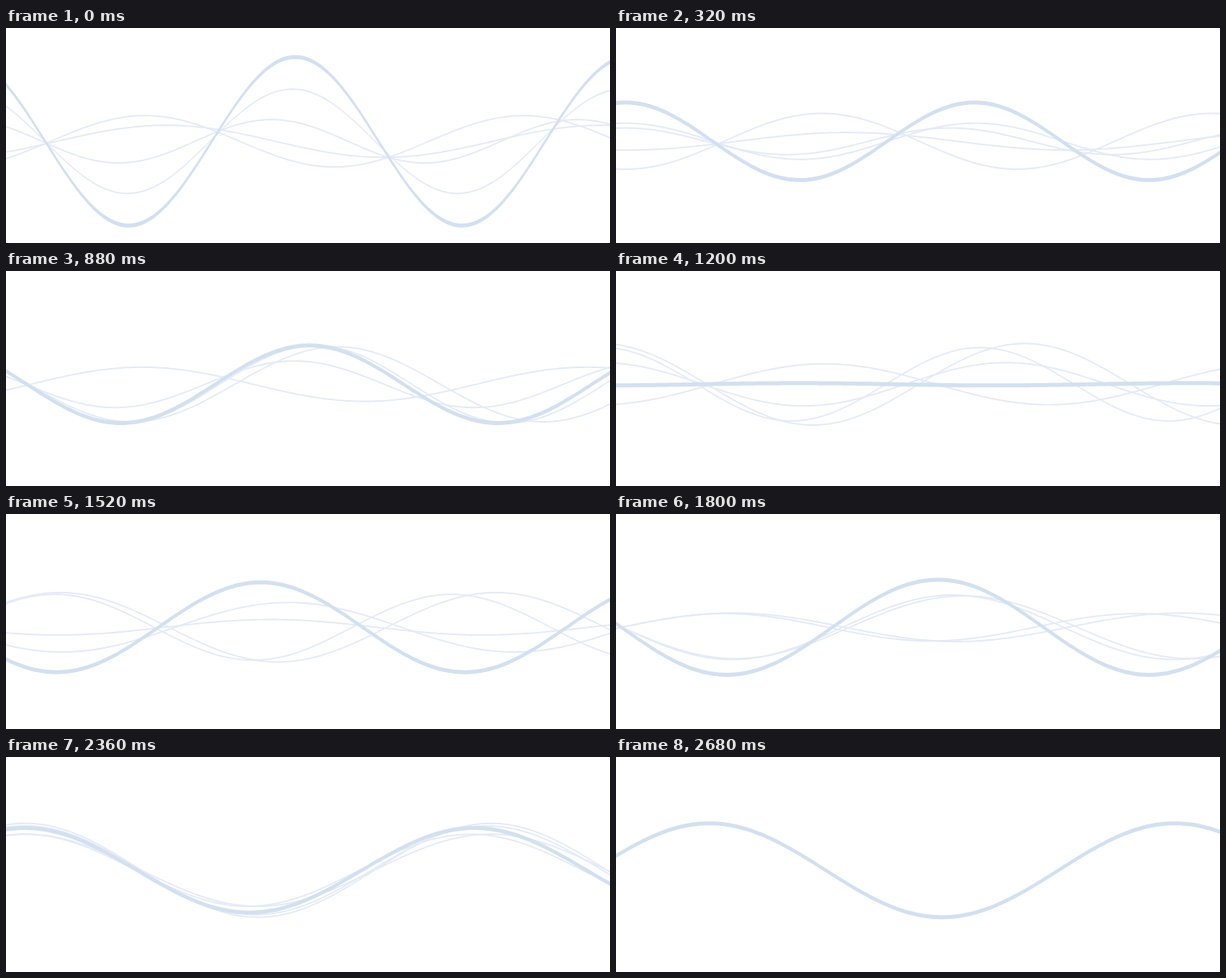
An HTML page for the animation above (2.72 s loop, 750 px wide and 268 px high).

```html
<!DOCTYPE html>
<html lang="en">
<head>
<meta charset="utf-8">
<title>Waves</title>
<style>
  html, body { margin: 0; width: 100%; height: 100%; overflow: hidden; background: #fff; }
  svg { display: block; width: 100%; height: 100%; }
</style>
</head>
<body>
<svg id="stage" viewBox="0 0 750 268"></svg>
<script>
const LOOP = 2720, STEP = 40, WIDTH = 750, MID = 141.2;
const END = 2680, END_HALF = 289, END_AMP = 58.5;
const THIN = { color: '#e4eaf6', thick: 1.9 };
const BOLD = { color: '#d3e0ef', thick: 5 };

// half: first half wavelength, which grows to END_HALF by the time meet
// turns: [time, amplitude] where the swing reverses
const waves = [
  { ...THIN, half: 270.5, meet: END, turns: [[0, -20], [1080, 25], [END, END_AMP]] },
  { ...THIN, half: 235, meet: 2300, turns: [[0, -32], [1280, -51], [END, END_AMP]] },
  { ...THIN, half: 190, meet: END, turns: [[0, 27], [1310, -47], [END, END_AMP]] },
  { ...THIN, half: 205, meet: 2180, turns: [[0, 65], [770, -50], [2180, END_AMP]] },
  { ...BOLD, half: 207, meet: END,
    turns: [[0, 105], [780, -52], [1660, 63], [2080, 48], [END, END_AMP]] }
];

const mix = (a, b, u) => a + (b - a) * u;
const ease = u => (1 - Math.cos(Math.PI * u)) / 2;

function swing(turns, t) {
  const next = turns.findIndex(turn => turn[0] > t);
  if (next < 0) return END_AMP;
  const [t0, a] = turns[next - 1], [t1, b] = turns[next];
  return mix(a, b, ease((t - t0) / (t1 - t0)));
}

// Ribbon of constant vertical thickness
function ribbon(half, amp, phase, thick) {
  const top = [], bottom = [];
  for (let x = -3; x <= WIDTH + 3; x += 3) {
    const y = MID + amp * Math.sin(Math.PI * x / half - phase);
    top.push(x + ' ' + (y - thick / 2).toFixed(2));
    bottom.push(x + ' ' + (y + thick / 2).toFixed(2));
  }
  return 'M' + top.concat(bottom.reverse()).join('L') + 'Z';
}

const stage = document.getElementById('stage');
for (const wave of waves) {
  wave.path = document.createElementNS(stage.namespaceURI, 'path');
  wave.path.setAttribute('fill', wave.color);
  stage.append(wave.path);
}

function draw(t) {
  const phase = 0.235 * Math.PI + 0.125 * t / STEP;
  for (const w of waves) {
    const half = mix(w.half, END_HALF, Math.min(1, t / w.meet));
    w.path.setAttribute('d', ribbon(half, swing(w.turns, t), phase, w.thick));
  }
}

const start = performance.now();
function tick() {
  const t = (performance.now() - start) % LOOP;
  draw(Math.floor(t / STEP) * STEP);
  requestAnimationFrame(tick);
}
tick();
</script>
</body>
</html>
```
